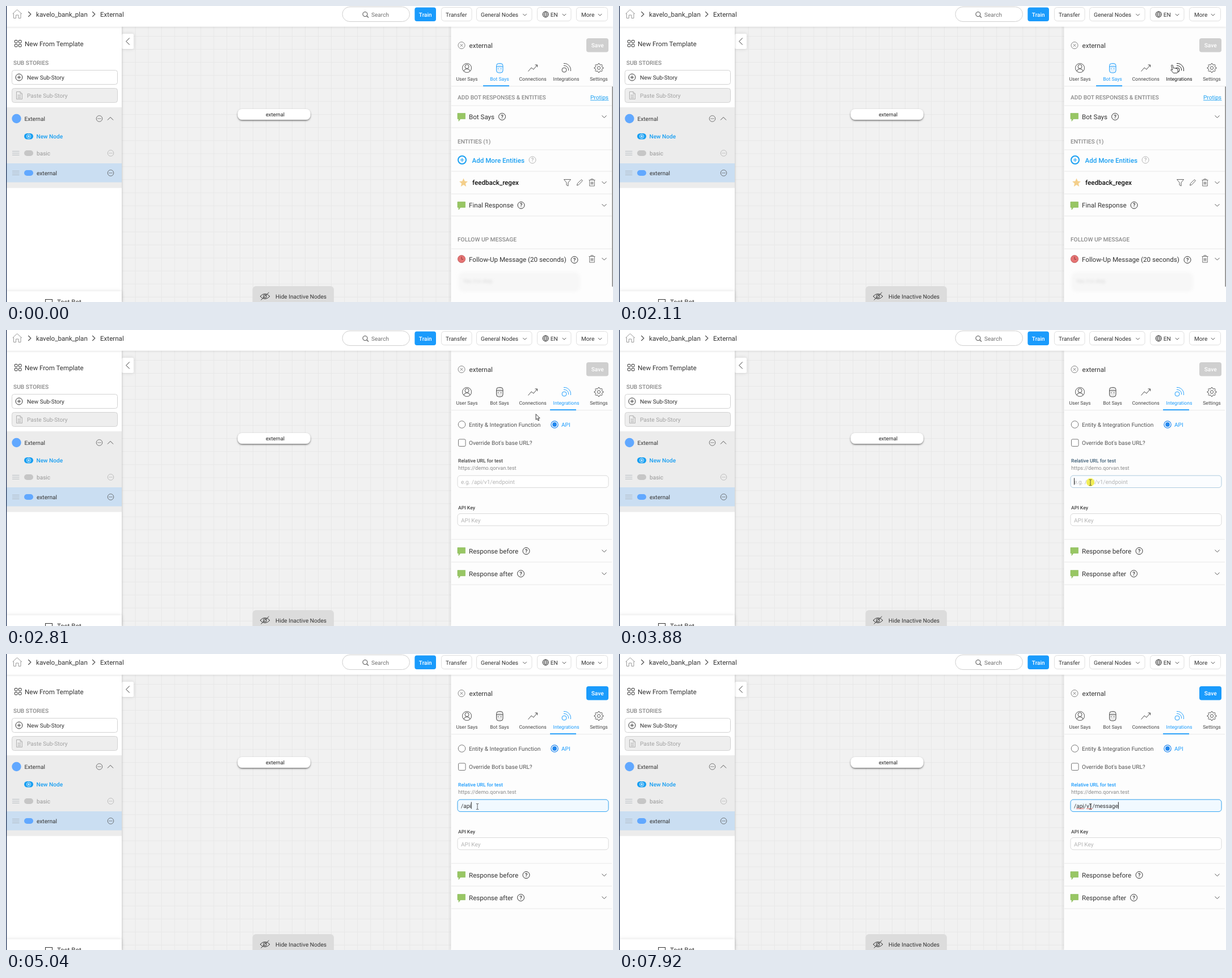
Write an HTML page that moves like this. It is 1070 px wide and 523 px high and loops after 8000 ms.

```html
<!DOCTYPE html>
<html lang="en">
<head>
<meta charset="utf-8">
<title>Bot builder</title>
<style>
  html, body { margin: 0; width: 100%; height: 100%; overflow: hidden; background: #fff; }
  svg { display: block; width: 1070px; height: 523px; }
  text { font-family: Roboto, sans-serif; text-rendering: geometricPrecision; white-space: pre; }
</style>
</head>
<body>
<svg id="stage" viewBox="0 0 1070 523"></svg>
<script>
const BLUE = '#1a9bfc', DARK = '#333', MID = '#555', GRAY = '#8a8a8a', PALE = '#b5b5b5';
const SMALL = 8.64, NORMAL = 10.1, LARGE = 11.6;

// Drawing helpers; the y of a label is the middle of its capitals.
const label = (x, y, str, size = NORMAL, fill = DARK, extra = '') =>
  `<text x="${x}" y="${y + size * .355}" font-size="${size}" fill="${fill}" ${extra}>${str}</text>`;
const medium = 'font-weight="500"', centred = 'text-anchor="middle"';
const box = (x, y, w, h, r, fill, stroke = 'none', extra = '') =>
  `<rect x="${x}" y="${y}" width="${w}" height="${h}" rx="${r}" fill="${fill}" stroke="${stroke}" ${extra}/>`;
const line = (d, stroke = MID, width = 1, extra = '') =>
  `<path d="${d}" fill="none" stroke="${stroke}" stroke-width="${width}" ${extra}/>`;
const ring = (x, y, r, stroke = MID, width = 1, fill = 'none') =>
  `<circle cx="${x}" cy="${y}" r="${r}" fill="${fill}" stroke="${stroke}" stroke-width="${width}"/>`;
const group = (id, content, extra = '') => `<g id="${id}" ${extra}>${content}</g>`;

const chevron = (x, y, angle = 0, w = 8, stroke = MID, width = 1) =>
  line(`M${-w / 2} ${-w / 4}L0 ${w / 4}L${w / 2} ${-w / 4}`, stroke, width, `transform="translate(${x} ${y}) rotate(${angle})"`);
const plus = (x, y, r, stroke, width = 1) => line(`M${x - r} ${y}h${2 * r}M${x} ${y - r}v${2 * r}`, stroke, width);
const help = (x, y, color = DARK) => ring(x, y, 6, color) + label(x, y, '?', 9.5, color, centred + medium);
const dots = (x, y, color = MID) => ring(x, y, 5.3, color, .8) +
  [-2.3, 0, 2.3].map(d => `<circle cx="${x + d}" cy="${y}" r=".7" fill="${color}"/>`).join('');
const handle = y => line([-3.3, 0, 3.3].map(d => `M11 ${y + d}h12.5`).join(''), '#a9b0b8', .8);
const rule = y => line(`M785 ${y}H1068`, '#e8e8e8');
const heading = (y, str, x = 796) => label(x, y, str, 10.2, GRAY, medium);
const bubble = y => `<path d="M796 ${y - 6}h13.5v10h-8.5l-3 4v-4h-2z" fill="#98c664" stroke="#84b852" stroke-width=".6"/>`;
const response = (y, str, helpX) =>
  bubble(y) + label(816, y, str, LARGE) + help(helpX, y) + chevron(1054.5, y);
const trash = y => line(`M1027.5 ${y - 4.5}h11M1031 ${y - 4.5}v-1.8h4v1.8M1028.7 ${y - 4}v10h8.6v-10M1031.3 ${y - 1.5}v5M1033 ${y - 1.5}v5M1034.7 ${y - 1.5}v5`, MID, .8);

function canvasArea() {
  return box(204, 36, 581, 487, 0, '#f1f1f1') + box(204, 36, 581, 487, 0, 'url(#grid)') +
    box(204, 49, 21, 27, 3, '#fff', 'none', 'filter="url(#soft)"') + chevron(214.8, 62.5, 90, 12, DARK) +
    box(408.5, 182, 128, 19, 8, '#fff', 'none', 'filter="url(#lift)"') +
    label(474.5, 192, 'external', 9.3, '#222', centred) +
    box(434.5, 495, 143.5, 40, 6, '#dcdcdc') +
    line('M448 513q8.500-9 17 0q-8.500 9-17 0M449.500 519.500L463.500 506', DARK) + ring(456.500, 513, 2.8, DARK) +
    label(475, 513, 'Hide Inactive Nodes');
}

function sidebar() {
  const tiles = [[15.5, 60.5], [22.5, 60.5], [15.5, 67.5], [22.5, 67.5]]
    .map(([x, y]) => box(x, y, 4.5, 4.5, .5, 'none', DARK)).join('');
  return box(0, 36, 204, 487, 0, '#fff', 'none', 'filter="url(#shade)"') +
    tiles + label(33, 66.5, 'New From Template', LARGE) +
    heading(100, 'SUB STORIES', 13) +
    box(10.5, 113.5, 186, 25, 4, '#fff', '#d2d2d2') + ring(23, 126, 6, DARK) + plus(23, 126, 3.2, DARK) +
    label(37, 126.5, 'New Sub-Story') +
    box(10.5, 145.5, 186, 25, 4, '#eee', '#d2d2d2') +
    line('M18.500 151.500h6.500l3.500 3.500v9.500h-10zM25 151.500v3.500h3.500M20.500 157.500h6M20.500 160h6M20.500 162.300h6', '#aaa', .9) +
    label(37, 158.5, 'Paste Sub-Story', NORMAL, '#a2a2a2') +
    box(1, 179, 203, 142.5, 0, '#ececec') +
    `<circle cx="18.500" cy="199" r="8.200" fill="#61a8ff"/>` + label(32.5, 199, 'External') +
    dots(164.5, 199) + chevron(184, 199, 180, 10) +
    box(32, 225, 16, 10.5, 5.2, '#189ff2') + ring(40, 230.2, 3.6, '#fff', .8) + plus(40, 230.2, 2, '#fff') +
    label(53.5, 230.5, 'New Node', NORMAL, '#189ff2', medium) +
    handle(260) + box(32, 255, 16, 10, 5, '#c6c6c6') + label(54, 260.5, 'basic', NORMAL, '#969696') + dots(184.5, 260, '#b0b0b0') +
    box(1, 278, 203, 33.5, 0, '#cadef2') + handle(295) + box(32, 290, 16, 10, 5, '#61a8ff') +
    label(54, 295.5, 'external') + dots(184.5, 295) +
    box(1, 504, 203, 30, 0, '#fff', 'none', 'filter="url(#soft)"') +
    box(69.5, 518.5, 12, 10, 0, 'none', DARK) + label(90, 523, 'Test Bot', LARGE);
}

function header() {
  const button = (x, w, str, textX) => box(x, 2.5, w, 24, 5, '#fff', '#dfdfdf') + label(textX, 15, str);
  return box(0, 0, 1070, 36.5, 0, '#fff', 'none', 'filter="url(#shade)"') +
    line('M11.500 14L19.500 6.500L28 14M13.500 13v8.500h4v-5.500h4.500v5.500h4v-8.500', '#999', 1) +
    chevron(41.5, 14.5, -90, 9, MID, 1.3) + label(53, 15, 'kavelo_bank_plan', LARGE) +
    chevron(154.5, 14.5, -90, 9, MID, 1.3) + label(166, 15, 'External', LARGE) +
    box(593, 1.5, 118.5, 26, 13, '#fff', '#cfcfcf') + ring(633, 14.5, 4, MID, 1.1) + line('M636 17.500l3 3', MID, 1.1) +
    label(644, 15, 'Search', NORMAL, '#707070') +
    box(720.4, 2.5, 37.6, 24.5, 4, BLUE) + label(739.3, 15, 'Train', NORMAL, '#fff', centred + medium) +
    button(767.5, 53.5, 'Transfer', 775) +
    button(829.5, 97.5, 'General Nodes', 837) + chevron(914.5, 15.5, 0, 6.5) +
    button(936.5, 59.5, 'EN', 959.7) + chevron(984, 15.5, 0, 6.5) +
    ring(951.2, 14.8, 5.2, DARK, .9) + line('M946 14.800h10.400M947 12.200h8.400M947 17.400h8.400M951.200 9.600q-4.600 5.200 0 10.400q4.600-5.200 0-10.400', DARK, .7) +
    button(1005.5, 55, 'More', 1014) + chevron(1047, 15.5, 0, 6.5);
}

function gear(x, y) {
  const corners = Array.from({ length: 32 }, (_, i) => {
    const r = i % 4 < 2 ? 8 : 6, a = (i - .5) * Math.PI / 16;
    return `${x + r * Math.cos(a)} ${y + r * Math.sin(a)}`;
  });
  return line(`M${corners.join('L')}Z`, 'currentColor', .9) + ring(x, y, 2.7, 'currentColor', .9);
}

function tabs() {
  const icon = d => line(d, 'currentColor', .95);
  const items = [
    [812.5, 'User Says', ring(812.5, 109.5, 8, 'currentColor', .95) + ring(812.5, 107, 3.5, 'currentColor', .95) + icon('M807 115q1-4 5.500-4t5.500 4')],
    [870, 'Bot Says', box(864.5, 101.5, 11.5, 16.5, 4, 'currentColor', 'currentColor', 'fill-opacity=".1" stroke-width=".95"') + icon('M864.500 107h11.500M867.500 110v1.500M872.500 110v1.500')],
    [928.5, 'Connections', icon('M920.500 115.500l5.500-6.500 4 3 6.500-8M932.500 104h4v4')],
    [987.5, 'Integrations', ring(984, 113, 4, 'currentColor', .95) + icon('M983 105.500a7.500 7.500 0 0 1 8.500 8.500M983 101.500a11.500 11.500 0 0 1 12.300 13.500')],
    [1045, 'Settings', gear(1045, 109.5)],
  ];
  return items.map(([x, name, art], i) =>
    group('tab' + i, art + label(x, 128.5, name, SMALL, 'currentColor', centred), 'color="#444"')).join('');
}

function botSaysView() {
  return heading(161.5, 'ADD BOT RESPONSES &amp; ENTITIES') +
    label(1030, 161.5, 'Protips', NORMAL, '#189ff2') + line('M1030 166.500h32.500', '#189ff2', .8) +
    [176, 215, 254, 292, 332, 371, 429].map(rule).join('') +
    response(195.5, 'Bot Says', 874.5) + heading(239, 'ENTITIES (1)') +
    ring(804, 272, 7, '#189ff2', 2) + plus(804, 272, 3.6, '#189ff2', 1.2) +
    label(821.5, 272.5, 'Add More Entities', LARGE, '#189ff2', medium) + help(928, 272, PALE) +
    `<path d="M806.500 304.500l2.200 5 5.300.5-4 3.600 1.200 5.400-4.700-2.900-4.700 2.900 1.200-5.400-4-3.600 5.300-.5z" fill="#f4cf8b"/>` +
    label(822, 312.3, 'feedback_regex', LARGE, '#111', medium) +
    line('M983.500 306.500h12l-4.500 5.500v6l-3-1.800v-4.200z', MID, .9) +
    line('M1006.500 317l.8-3.300 6.500-6.500q1.500-.8 2.500 1.500l-6.500 7z', MID, .9) + trash(312) + chevron(1054.5, 312) +
    response(352, 'Final Response', 908) + heading(412.7, 'FOLLOW UP MESSAGE') +
    ring(803, 447, 6.6, '#b95c5c', .8, '#e57373') + line('M803 443v4.500h3', '#8f3a3a') +
    label(816, 447.5, 'Follow-Up Message (20 seconds)', LARGE) + help(1002, 448.5) + trash(447) + chevron(1054.5, 447) +
    box(797, 470, 215, 35, 10, '#f7f7f7', 'none', 'filter="url(#blur)"') +
    label(806, 485.5, 'Yes, it is okay', 8.6, '#d0d0d0', 'filter="url(#blur)"') +
    box(1068.3, 142, 1.7, 354, .8, '#8c8c8c');
}

function integrationsView() {
  const field = (y, stroke, extra) => box(796, y, 266, 21.3, 5, '#fff', stroke, extra);
  const key = label(797, 313.5, 'API Key', SMALL, '#444', medium) +
    field(324.5, '#dadada') + label(802, 336, 'API Key', NORMAL, PALE);
  return ring(803.5, 167, 6.3, '#777', 1, '#fff') + label(816, 167.5, 'Entity &amp; Integration Function', NORMAL, MID) +
    ring(967, 167, 6.2, '#2287ee', 1.2, '#fff') + `<circle cx="967" cy="167" r="3.900" fill="#2287ee"/>` +
    label(979, 167.5, 'API', NORMAL, BLUE) +
    box(797.5, 193, 12.5, 12.5, 2, '#fff', '#777') + label(816, 199.5, "Override Bot's base URL?", NORMAL, MID) +
    label(797, 231, '', SMALL, '#444', 'id="fieldName"' + medium) +
    group('fields', field(257.2, '#dadada') +
      box(796, 257.2, 266, 21.3, 5, '#f1f9ff', '#36a7f5', 'id="focus"') +
      label(802, 268, 'e.g. /api/v1/endpoint', NORMAL, PALE, 'id="hint"') + key + rule(370)) +
    group('loaded', label(797, 244, 'https://demo.qorvan.test', 9.27, GRAY) +
      rule(410) + rule(450) + response(390.5, 'Response before', 917) + response(430.5, 'Response after', 907.5)) +
    label(802, 268, '', NORMAL, DARK, 'id="typed"') +
    line('', '#e0443e', .9, 'id="squiggle"') + box(802, 261.5, 1, 12, 0, '#222', 'none', 'id="caret"');
}

const defs = `<defs>
  <pattern id="grid" width="23.040" height="23.040" patternUnits="userSpaceOnUse" x="204.500" y="53">
    <path d="M.5 0V24M0 .5H24" stroke="#e7e7e7"/></pattern>
  <filter id="shade" x="-10%" y="-50%" width="120%" height="200%"><feDropShadow dx="0" dy="0" stdDeviation="2" flood-opacity=".2"/></filter>
  <filter id="soft" x="-50%" y="-50%" width="200%" height="200%"><feDropShadow dx="0" dy="0" stdDeviation="3" flood-opacity=".13"/></filter>
  <filter id="lift" x="-10%" y="-50%" width="120%" height="220%"><feDropShadow dx="0" dy="1.500" stdDeviation="1.400" flood-opacity=".55"/></filter>
  <filter id="blur" x="-20%" y="-60%" width="140%" height="220%"><feGaussianBlur stdDeviation="2.500"/></filter></defs>`;

const pointers =
  group('arrow', `<path d="M0 0v9.800l2.300-2 1.600 3.700 1.600-.7-1.600-3.600h3.100z" fill="#fff" stroke="#222" stroke-width=".9"/>`) +
  group('hand', `<path d="M-1.500 1q1.500-2 2.700 0l1 5q2-1.500 3 .3q2-1 2.800.6q1.500-.5 1.800 1l.4 3q0 2-1.400 3.500h-6.500l-4.700-5.500q.5-2 3 .3z" fill="#fff" stroke="#222" stroke-width=".9"/>`) +
  group('beam', line('M-2.200-4.500h1.600l.6.700.6-.7h1.600M0-4v9M-2.200 5.500h1.600l.6-.7.6.7h1.600', '#333', .8));

document.getElementById('stage').innerHTML = defs + canvasArea() + sidebar() +
  box(784.5, 36, 286, 487, 0, '#fdfdfd', 'none', 'filter="url(#shade)"') + header() +
  ring(803, 69.5, 6, '#777', .9) + line('M800.600 67.100l4.800 4.800m0-4.800l-4.800 4.800', '#777', .9) + label(816.5, 70, 'external', LARGE) +
  box(1023, 57, 39, 24.5, 4, '#cfcfcf', 'none', 'id="save"') + label(1042.7, 69.8, 'Save', NORMAL, '#fff', centred + medium) +
  tabs() + rule(141.8) + box(0, 140.2, 46, 1.8, 0, BLUE, 'none', 'id="underline"') +
  group('botSays', botSaysView()) + group('integrations', integrationsView()) +
  box(0, 0, 1.3, 523, 0, '#27395c') +
  group('pointer', `<circle id="click" r="7.200" fill="#f3ef3c" opacity=".85"/>` + pointers);

const el = Object.fromEntries([...document.querySelectorAll('[id]')].map(node => [node.id, node]));
const ramp = (t, from, to) => Math.min(1, Math.max(0, (t - from) / (to - from)));
const mix = (from, p) => `color-mix(in srgb, ${BLUE} ${p * 100}%, ${from})`;
const show = (id, on) => el[id].style.display = on ? '' : 'none';
const fade = (id, p) => el[id].style.opacity = p;

// Pointer path as [ms, x, y]
const path = [[190, 986, 367], [260, 987, 194], [489, 987, 194], [490, 986, 165], [640, 994, 55], [799, 994, 55],
  [960, 1050, 28], [1120, 1036, 30], [1200, 1025, 36], [1430, 975, 117], [1580, 982, 106], [1800, 973, 99],
  [1949, 973, 99], [1950, 967, 96], [2109, 967, 96], [2110, 975, 104], [2640, 975, 104], [2870, 920, 164],
  [2959, 920, 164], [2960, 887, 186], [3189, 887, 186], [3650, 831, 269]];
function pointerAt(t) {
  const next = path.findIndex(key => key[0] > t);
  if (next < 1) return path.at(next).slice(1);
  const [t0, x0, y0] = path[next - 1], [t1, x1, y1] = path[next], p = (t - t0) / (t1 - t0);
  return [x0 + (x1 - x0) * p, y0 + (y1 - y0) * p];
}

const message = '/api/v1/message';
const keyTimes = [4650, 4800, 4950, 5040, 5280, 5980, 6210, 6300, 6610, 6760, 6990, 7540, 7690, 7840, 7920];
const wave = (from, to) => {
  let d = `M${from} 274`;
  for (let x = from + 1.5, up = true; x <= to; x += 1.5, up = !up) d += `L${x} ${up ? 272.6 : 274}`;
  return d;
};

function drawPointer(t) {
  const [x, y] = pointerAt(t);
  const kind = y > 250 && t > 3000 ? 'beam' : t > 1400 && t < 2720 ? 'hand' : 'arrow';
  show('pointer', t >= 190);
  ['arrow', 'hand', 'beam'].forEach(id => show(id, id === kind));
  show('click', t >= 3880 && t < 4060);
  el.pointer.setAttribute('transform', `translate(${x} ${y})`);
}

function drawTabs(t) {
  const moved = 1 - (1 - ramp(t, 2190, 2490)) ** 2;
  el.underline.setAttribute('x', 841 + 118 * moved);
  el.tab1.style.color = mix('#444', 1 - moved);
  el.tab3.style.color = mix(t > 1430 ? '#111' : '#444', moved);
  fade('botSays', 1 - ramp(t, 2180, 2270));
  fade('integrations', ramp(t, 2230, 2430));
}

function drawForm(t) {
  const loaded = t >= 2580;
  const focus = t < 3880 ? 0 : .25 + .75 * ramp(t, 3880, 4100);
  el.fieldName.textContent = loaded ? 'Relative URL for test' : 'API endpoint';
  el.fieldName.style.fill = mix('#444', focus);
  el.fields.setAttribute('transform', `translate(0 ${loaded ? 0 : -15.5})`);
  show('loaded', loaded);
  fade('focus', focus);

  const count = keyTimes.filter(time => time <= t).length;
  el.typed.textContent = message.slice(0, count);
  show('hint', !count);
  const end = 802 + (count ? el.typed.getComputedTextLength() : 0);
  el.caret.setAttribute('x', end);
  show('caret', t >= 3880 && !(t >= 4410 && t < 4650) && !(t >= 5830 && t < 5980));
  el.squiggle.setAttribute('d', (t >= 5350 ? wave(806, 820) : '') + (t >= 6380 ? wave(824, 834.5) : ''));
  el.save.style.fill = mix('#cfcfcf', ramp(t, 4650, 4880));
}

function frame(now) {
  const t = now % 8000;
  drawPointer(t);
  drawTabs(t);
  drawForm(t);
  requestAnimationFrame(frame);
}
requestAnimationFrame(frame);
</script>
</body>
</html>
```
